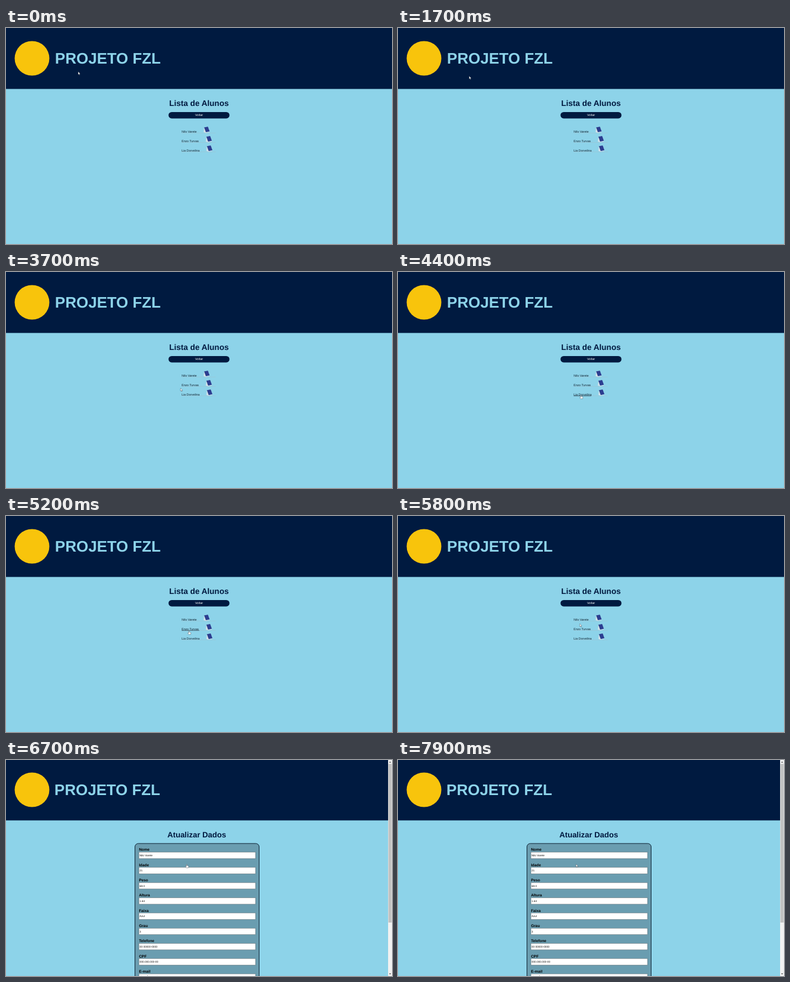
Recreate the animation shown at these times as an HTML page. Size 690 by 388 pixels, loop 8000 ms.

```html
<!DOCTYPE html>
<html lang="pt-BR">
<head>
<meta charset="utf-8">
<title>Lista de Alunos</title>
<style>
  html, body { margin: 0; width: 100%; height: 100%; overflow: hidden; background: #8dd3e9; }
  svg { display: block; font-family: "Liberation Sans", Arial, sans-serif; text-rendering: geometricPrecision; }
  .title { font-size: 27.5px; font-weight: bold; fill: #8dd3e9; }
  .heading { font-weight: bold; fill: #001a40; text-anchor: middle; }
  .item { font-size: 5.5px; fill: #10222f; }
  .label { font-size: 6.8px; font-weight: bold; fill: #000; }
  .value { font-size: 4.75px; fill: #111; }
</style>
</head>
<body>
<svg width="690" height="388" viewBox="0 0 690 388">
  <defs>
    <g id="book">
      <path d="M1.2 1.4 .2 9.8 4.2 11.2 11.2 9.6 10.8 8.7 4.6 10Z" fill="#d3e1ea"/>
      <path d="M1.5 1.2 7.9 0 11 8.5 4.6 9.9Z" fill="#2c3d90"/>
      <path d="M1.5 1.2 4.6 9.9" stroke="#1b2a68" stroke-width=".5"/>
    </g>
  </defs>
  <rect width="690" height="388" fill="#8dd3e9"/>
  <g id="list"></g>
  <g id="form"></g>
  <path id="arrow" d="M0 0V5.2L1.2 4.1 2.1 6 3 5.6 2.1 3.8H3.8Z" fill="#fff" stroke="#27313c" stroke-width=".4"/>
  <path id="hand" d="M-.6 .5Q0-.4.6.5V2.6L3 3.2Q3.6 3.4 3.5 4L3 6.8H-.7L-2.2 4.3Q-2 3.4-.6 4.4Z" fill="#fff" stroke="#27313c" stroke-width=".4"/>
</svg>
<script>
const LOOP = 8000, STEP = 100, SWITCH = 6700;
const $ = id => document.getElementById(id);
const students = ['Nilo Varete', 'Enzo Turvas', 'Lia Dorvelina'];
const fields = [
  ['Nome', students[0]], ['Idade', '21'], ['Peso', '68.0'],
  ['Altura', '1.64'], ['Faixa', 'Azul'], ['Grau', '3'],
  ['Telefone', '00 00000-0000'], ['CPF', '000.000.000-00'], ['E-mail', 'aluno@example.com']
];
const bookX = [353, 357, 358];

const text = (cls, x, y, str, extra = '') => `<text class="${cls}" x="${x}" y="${y}" ${extra}>${str}</text>`;
const rect = (x, y, w, h, fill, extra = '') =>
  `<rect x="${x}" y="${y}" width="${w}" height="${h}" fill="${fill}" ${extra}/>`;
const header = (width, height, x) =>
  rect(0, 0, width, height, '#001a40') +
  `<circle cx="46.5" cy="${height - 55}" r="31" fill="#f8c40c"/>` +
  text('title', x, height - 45.2, 'PROJETO FZL');

$('list').innerHTML = header(690, 109.5, 87.6) +
  text('heading', 345, 140.4, 'Lista de Alunos', 'font-size="14.35"') +
  rect(290.5, 150.9, 109, 11.5, '#001a40', 'rx="5.7"') +
  text('', 345, 158.4, 'Voltar', 'font-size="5.5" fill="#fff" text-anchor="middle"') +
  students.map((name, i) => {
    const y = 188 + i * 16.9;
    return rect(314, y + .6, 61, .5, '#9fbfcc') +
      `<use href="#book" x="${bookX[i]}" y="${y - 10.8}"/>` +
      text('item', 314, y, name) +
      `<path class="line" d="M314 ${y + .8}h${i ? 31.5 : 27}" stroke="#10222f" stroke-width=".6"/>`;
  }).join('');

$('form').innerHTML = rect(0, 0, 690, 388, '#8dd3e9') + header(683, 108.5, 86.6) +
  text('heading', 341, 139.2, 'Atualizar Dados', 'font-size="13.9"') +
  rect(230.5, 150, 222, 260, '#6a9db0', 'rx="6" stroke="#06182a"') +
  fields.map(([label, value], i) => {
    const y = 163.4 + i * 27.32;
    return text('label', 237.7, y, label) +
      rect(237.8, y + 2.2, 208.2, 11.4, '#fff', 'stroke="#6b7478" stroke-width=".6"') +
      text('value', 238.8, y + 9.5, value);
  }).join('') +
  rect(683, 0, 7, 388, '#f1f1f1') + rect(683.6, 7, 5.8, 285, '#c1c1c1') +
  '<path d="M684.8 4.8h3.6l-1.8-2.2ZM684.8 383.2h3.6l-1.8 2.2Z" fill="#505050"/>';

const lines = [...document.querySelectorAll('.line')];

// Pointer stops: time, x, y
const path = [
  [0, 129, 78.5], [1200, 129, 78.5], [1700, 127.2, 86.5], [2000, 127.2, 86.5],
  [2900, 347.3, 249], [3400, 290, 231], [3700, 312, 208.8], [3800, 314.5, 209],
  [4200, 327, 221.5], [4300, 327, 221.5], [5200, 327, 206], [5400, 328.5, 205.5],
  [5500, 328.5, 205.5], [6000, 323, 187], [6700, 323, 187], [7000, 318.2, 187], [LOOP, 318.2, 187]
];
const ease = p => p * p * (3 - 2 * p);

function pointer(t) {
  const i = path.findIndex(stop => stop[0] > t);
  const [t0, x0, y0] = path[i - 1], [t1, x1, y1] = path[i];
  const p = ease((t - t0) / (t1 - t0));
  return [x0 + (x1 - x0) * p, y0 + (y1 - y0) * p];
}

function hovered(t, x, y) {
  if (t < 3800 || t > SWITCH || x < 314 || x > 346) return -1;
  return students.findIndex((_, i) => Math.abs(y - 186.5 - i * 16.9) < 4);
}

function draw(now) {
  const t = Math.floor(now % LOOP / STEP) * STEP;
  const [x, y] = pointer(t), hot = hovered(t, x, y), isForm = t >= SWITCH;
  const show = (el, on) => { el.style.display = on ? '' : 'none'; };
  show($('list'), !isForm);
  show($('form'), isForm);
  lines.forEach((line, i) => show(line, i === hot));
  show($('hand'), hot >= 0);
  show($('arrow'), hot < 0);
  for (const id of ['hand', 'arrow']) $(id).setAttribute('transform', `translate(${x} ${y})`);
}

const start = performance.now();
function tick() {
  draw(performance.now() - start);
  requestAnimationFrame(tick);
}
tick();
</script>
</body>
</html>
```
